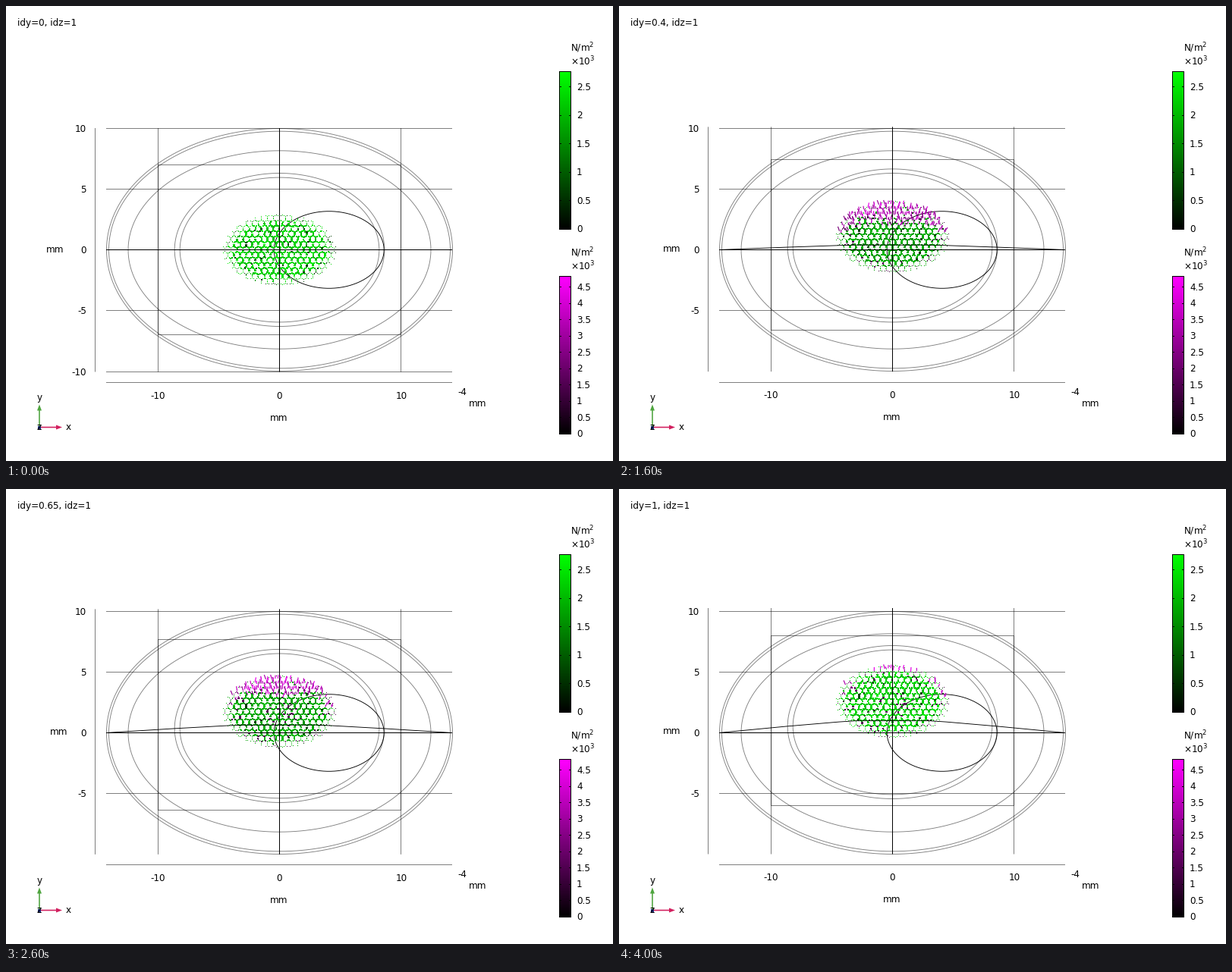
These frames come from a looping animation (800x600 px, 4200 ms). A matplotlib script:

```python
import numpy as np
import matplotlib.pyplot as plt
from matplotlib.animation import FuncAnimation
from matplotlib.collections import LineCollection
from matplotlib.colors import LinearSegmentedColormap

DPI = 100
PX = 72 / DPI
FRAMES = 21
CX, CY = 360.5, 321.5
UNIT = 16.05
GRAY = (0, 0, 0, .5)

plt.rcParams.update({"font.family": "DejaVu Sans", "font.size": 12 * PX,
                     "mathtext.fontset": "dejavusans"})
fig = plt.figure(figsize=(800 / DPI, 600 / DPI), dpi=DPI, facecolor="white")
ax = fig.add_axes([0, 0, 1, 1])
ax.axis("off")


def pixel(value):
    """Centre of the pixel row or column that holds the value."""
    return np.floor(value) + .5


def line(xs, ys, color=GRAY, width=1, z=1):
    return ax.plot(xs, ys, color=color, lw=width * PX, zorder=z, snap=False,
                   solid_capstyle="butt")[0]


def label(x, y, text, ha="left"):
    return ax.text(x, y, text, ha=ha, va="baseline", zorder=9)


def ellipse(rx, ry, cx=CX, color=GRAY, z=1):
    a = np.linspace(0, 2 * np.pi, 181)
    ys = CY + ry * np.sin(a)
    return line(cx + rx * np.cos(a), ys, color, .9, z), a, ys


def colorbar(top, color, peak, ticks):
    bottom = top + 208
    cmap = LinearSegmentedColormap.from_list("bar", ["black", color])
    ax.imshow(np.linspace(1, 0, 208)[:, None], cmap=cmap, aspect="auto",
              extent=(729, 745, bottom + 1, top), zorder=1)
    line([729.5, 744.5, 744.5, 729.5, 729.5],
         [top + .5, top + .5, bottom + .5, bottom + .5, top + .5], "black", z=2)
    for value in ticks:
        y = bottom + .5 - 208 * value / peak
        line([729, 732], [pixel(y)] * 2, "black", z=3)
        line([742, 745], [pixel(y)] * 2, "black", z=3)
        label(752, round(y + 4), f"{value:g}")
    label(744, top - 26, r"N/m$^2$")
    label(744, top - 8, r"$\times$10$^3$")


def arrow(dx, dy, color):
    ox, oy = 44, 555.5
    line([ox, ox + 23 * dx], [oy, oy + 23 * dy], color, 1.6, 4)
    tip, base = np.array([ox + 30 * dx, oy + 30 * dy]), np.array([ox + 22 * dx, oy + 22 * dy])
    side = 3 * np.array([-dy, dx])
    ax.fill(*np.array([tip, base + side, base - side]).T, color=color, lw=0, zorder=4)


# Fixed grid, outlines, legends and axis triad
for value in (10, 5, 0, -5):
    y = CY - UNIT * value
    line([132, 588], [pixel(y)] * 2)
    label(106, round(y + 4.6), f"{value}", "right")
bottom_grid = line([132, 588], [482.5, 482.5])
bottom_label = label(106, 487, "-10", "right")
for rx, ry in ((228, 160), (225, 156.3), (199.5, 130.7)):
    ellipse(rx, ry)
ellipse(72.5, 50.8, 425.7, "black", 2)
line([132, 588], [CY, CY], "black", z=6)
colorbar(86, "#00ff00", 2.77, np.arange(0, 2.6, .5))
colorbar(356, "#ff00ff", 4.83, np.arange(0, 4.6, .5))
arrow(1, 0, "#d2205f")
arrow(0, -1, "#4fa53f")
ax.plot(44, 555.5, "s", ms=4 * PX, color="#1c2f80", mew=0, zorder=5)
label(44, 559, "z", "center")
label(44, 520, "y", "center")
label(79, 559, "x")
title = label(15, 26, "")

# Moving outlines
rings = [ellipse(138.3, 101), ellipse(131.3, 95.4)]
box = line([200.5, 520.5, 520.5, 200.5, 200.5], [0] * 5, z=3)
verticals = [line([x, x], [0, 0], c, z=z) for x, c, z in
             ((117.5, GRAY, 1), (200.5, GRAY, 1), (520.5, GRAY, 1), (CX, "black", 6))]
base_line = line([132, 588], [496.5, 496.5])
bend_x = np.array([132, 160, 222, 290, 312, 409, 431, 498, 560, 588])
bend_h = np.array([0, .17, .54, .9, .99, .99, .9, .54, .17, 0])
bend = line(bend_x, bend_x, "black", .9, 6)
x_labels = [label(x, 518, t, "center") for x, t in ((200, "-10"), (360, "0"), (521, "10"))]
unit_x = label(360, 547, "mm", "center")
unit_y = label(53, 325, "mm")
depth = label(595, 513, "-4")
depth_unit = label(610, 528, "mm")

# Arrows seen end-on, at the corners and edge midpoints of a honeycomb
rng = np.random.default_rng(5)
RX, RY, PITCH = 74.5, 46.5, 8
EDGE = PITCH / np.sqrt(3)
node_x = np.array([0, 0, 0, PITCH / 4, -PITCH / 4])
node_y = EDGE * np.array([-.5, .5, 0, .75, .75])
row, col, node = np.meshgrid(np.arange(-8, 9), np.arange(-11, 12), np.arange(5),
                             indexing="ij")
hx = (PITCH * (col + .5 * (row % 2)) + node_x[node]).ravel()
hy = (1.5 * EDGE * row + node_y[node]).ravel()
hx = hx + rng.normal(0, .15, hx.size)
hy = hy + rng.normal(0, .15, hy.size)
inside = np.hypot(hx / RX, hy / RY) < 1
hx, hy = hx[inside], hy[inside]
u, v = hx / RX, -hy / RY
radius = np.hypot(u, v)
chance, shade, lean = rng.random((3, hx.size))

brightness = .72 + .26 * shade
brightness[(chance > .95) | ((radius > .9) & (shade < .25))] *= .35
sizes = np.where(radius > .92, 1, np.where(radius > .82, 1.6, 2.2))
dots = ax.scatter(hx, hy, s=(sizes * PX) ** 2, marker="s", lw=0,
                  antialiased=False, zorder=4)
streaks = LineCollection([], linewidths=1.2 * PX, zorder=5)
ax.add_collection(streaks)
ax.set_xlim(0, 800)
ax.set_ylim(600, 0)


def purple_mask(t):
    limit = np.interp(t, [.15, .25, .4, .6, .75, .9, 1],
                      [1.3, 1.1, .42, .45, .56, .62, .9])
    top = chance < np.clip((v - limit - .2 * u ** 2 * (t > .5)) / .3 + .4, 0, .8)
    edge = (radius > .8) & (np.abs(u) > .58) & (v > .1)
    edge &= chance < np.interp(t, [.12, .25, .4, .65, 1], [0, .5, .5, .25, .2])
    return top | edge


def draw_cloud(t):
    x = CX + hx
    y = CY + hy * (1 + .02 * t) - np.interp(t, [0, .9, 1], [0, 38.8, 41.3])
    purple = purple_mask(t)
    colors = np.zeros((hx.size, 4))
    colors[:, 1] = brightness * (.95 - .2 * np.sin(np.pi * t))
    colors[:, 3] = 1
    murky = (radius > .7) & (shade < .15) & (t > .2)
    core = np.hypot(u - .08, v + .1) < .34
    murky |= core & (chance > 1 - np.interp(t, [.55, .75, .9, 1], [0, .4, .45, .15]))
    colors[murky, :3] = (.3, .05, .3)
    colors[purple, 3] = 0
    dots.set_offsets(np.column_stack([x, y]))
    dots.set_facecolors(colors)

    length = 2.5 + 3.5 * shade[purple]
    tilt = (lean[purple] - .5) * 4 + u[purple] * 1.5
    streaks.set_segments([[(a, b + m / 2), (a + d, b - m / 2)]
                          for a, b, m, d in zip(x[purple], y[purple], length, tilt)])
    glow = np.clip(.3 + .3 * v[purple] + .25 * t + .4 * (lean[purple] - .3), .3, .92)
    streaks.set_color(np.column_stack([glow, 0 * glow, glow, 0 * glow + 1]))


def update(i):
    t = i / (FRAMES - 1)
    title.set_text(f"idy={t:.4g}, idz=1")
    bottom_grid.set_visible(i == 0)
    bottom_label.set_visible(i == 0)
    for ring, a, ys in rings:
        ring.set_ydata(ys - t * (14 - 5.4 * np.cos(a) ** 2))
    high, low = (pixel(CY - UNIT * (t + half)) for half in (7, -7))
    box.set_ydata([high, high, low, low, high])
    for vertical in verticals:
        vertical.set_ydata([161 - 4 * t, 482.5 - t])
    base_line.set_ydata([pixel(496.6 - 1.2 * t)] * 2)
    bend.set_ydata(CY - 16 * t * bend_h)
    drop = round(512.6 - 1.6 * t) - 513
    for text in x_labels:
        text.set_y(518 + drop)
    unit_x.set_y(547 + drop)
    unit_y.set_position((53 if i == 0 else 58, round(325.3 - 2.2 * t)))
    depth.set_y(round(513.4 - 1.8 * t))
    depth_unit.set_y(round(528.4 - 1.6 * t))
    draw_cloud(t)
    return []


anim = FuncAnimation(fig, update, frames=FRAMES, interval=200, repeat=True,
                     repeat_delay=0, init_func=lambda: update(0))
plt.show()
```
